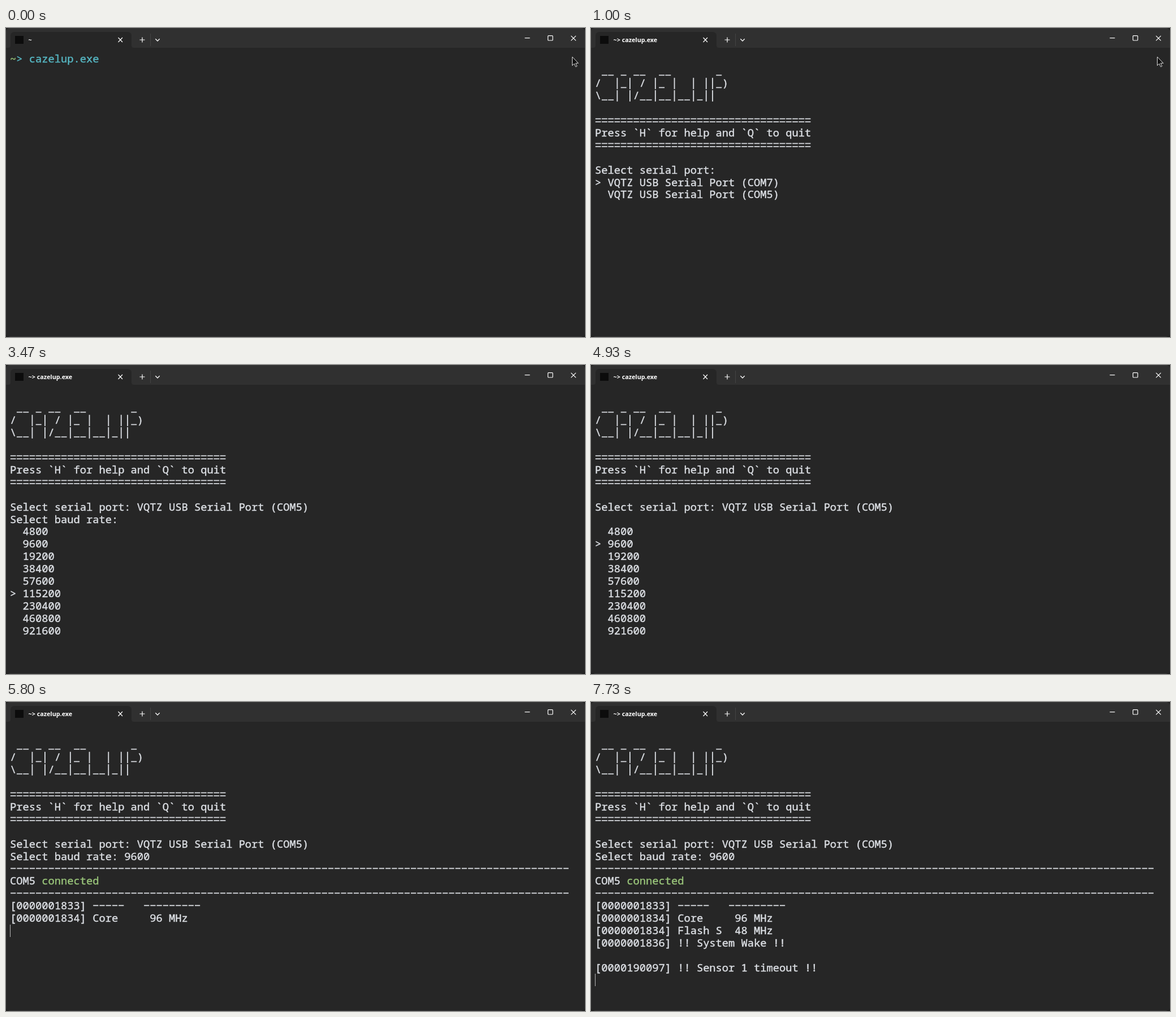
These frames come from a looping animation (1024 by 547 pixels, 8 s). An HTML page with a canvas:

```html
<!DOCTYPE html>
<html lang="en">
<head>
<meta charset="utf-8">
<title>Terminal</title>
<style>
html, body { margin: 0; width: 100%; height: 100%; overflow: hidden; background: #262626; }
canvas { display: block; }
</style>
</head>
<body>
<canvas id="stage" width="1024" height="547"></canvas>
<script>
const ctx = document.getElementById('stage').getContext('2d');
const LOOP = 8000;
const LEFT = 7.1, TOP = 43.1, CELL = 11.237, LINE = 21.9;
const WHITE = '#dcdfe4', GREEN = '#98c379', CYAN = '#56b6c2';
const APP = 'cazelup.exe';
const PORT = n => `VQTZ USB Serial Port (COM${n})`;
const RATES = [4800, 9600, 19200, 38400, 57600, 115200, 230400, 460800, 921600];

// Strokes that fill the cell: x, y, width, height
const STROKES = {
  '-': [[1, 9.7, 9.2, 1.8]],
  '=': [[0.7, 7.2, 9.8, 1.7], [0.7, 12.7, 9.8, 1.7]],
  '_': [[0.6, 17.7, 10, 1.7]],
  '|': [[4.7, 1.3, 1.8, 20]]
};

const BANNER = [
  ' __ _ __  __       _ ',
  '/  |_| / |_ |  | ||_)',
  '\\__| |/__|__|__|_||',
  '',
  '='.repeat(34),
  'Press `H` for help and `Q` to quit',
  '='.repeat(34)
];

// Log lines with the time each one arrives
const LOG = [
  [5270, '[0000001833] -----   ---------'],
  [5800, '[0000001834] Core     96 MHz'],
  [6330, '[0000001834] Flash S  48 MHz'],
  [6800, '[0000001836] !! System Wake !!'],
  [7200, ''],
  [7730, '[0000190097] !! Sensor 1 timeout !!']
];

// Index of the marked rate over time
const PICKS = [[3470, 5], [3800, 4], [3930, 3], [4070, 2], [4400, 1]];

function print(row, text, col = 0, color = WHITE) {
  ctx.fillStyle = ctx.strokeStyle = color;
  ctx.lineWidth = 0.45; // thickens the regular weight a little
  ctx.lineJoin = 'round';
  ctx.font = '18.73px "Noto Sans Mono", "DejaVu Sans Mono", monospace';
  const y = TOP + row * LINE;
  [...text].forEach((ch, i) => {
    const x = LEFT + (col + i) * CELL;
    if (STROKES[ch]) {
      STROKES[ch].forEach(([dx, dy, w, h]) => ctx.fillRect(x + dx, y + dy, w, h));
    } else if (ch !== ' ') {
      ctx.fillText(ch, x, y + 17.4);
      ctx.strokeText(ch, x, y + 17.4);
    }
  });
}

function caret(row, col = 0) {
  ctx.fillStyle = '#b4b4b4';
  ctx.fillRect(Math.round(LEFT + col * CELL), Math.round(TOP + row * LINE), 1, 22);
}

function box(x, y, w, h, r, color) {
  ctx.fillStyle = color;
  ctx.beginPath();
  ctx.roundRect(x, y, w, h, r);
  ctx.fill();
}

function line(d, color = '#fff', width = 1.2) {
  ctx.strokeStyle = color;
  ctx.lineWidth = width;
  ctx.lineJoin = 'miter';
  ctx.stroke(new Path2D(d));
}

function drawWindow(title) {
  ctx.fillStyle = '#1c1c1c';
  ctx.fillRect(0, 0, 1024, 547);
  box(0, 0, 1024, 547, 6, '#262626');
  box(0, 0, 1024, 35, [6, 6, 0, 0], '#303030');
  ctx.fillStyle = '#262626';
  ctx.fill(new Path2D('M4 35Q8 35 8 31V14Q8 7 15 7H215Q222 7 222 14V31Q222 35 226 35Z'));
  line('M6 .5H1018M6 546.5H1018', '#363636', 1);

  box(16, 14, 15, 14, 0, '#0c0c0c');
  ctx.fillStyle = '#fff';
  ctx.font = '700 10.8px "Open Sans", "Noto Sans", sans-serif';
  ctx.fillText(title, 39.5, 25.3);

  line('M198.5 17l7.5 8m0-8l-7.5 8');
  line('M236.5 21h9M241 16.5v9');
  line('M255.5 10v22', '#444', 1);
  line('M264.3 19.3l3.7 3.7 3.7-3.7', '#fff', 1.3);
  line('M917.5 17.7h9');
  line('M959.5 13.6h6.4q1 0 1 1v6.4q0 1-1 1h-6.4q-1 0-1-1v-6.4q0-1 1-1z');
  line('M999.3 13.8l8.6 8.6m0-8.6l-8.6 8.6');
}

function drawPointer() {
  const d = 'M1001.5 51v15.4l3.5-3.3 2.5 5.6 2.4-1.1-2.4-5.3h4.7z';
  ctx.fillStyle = '#111';
  ctx.fill(new Path2D(d));
  line(d, '#ddd', 1);
}

function drawPorts(marked) {
  print(9, 'Select serial port:');
  [7, 5].forEach((n, i) => print(10 + i, (i === marked ? '> ' : '  ') + PORT(n)));
}

function drawRates(t) {
  const marked = PICKS.filter(([at]) => t >= at).pop()[1];
  if (t < 4930) print(10, 'Select baud rate:');
  RATES.forEach((rate, i) => {
    const redrawing = i === 0 && t >= 4400 && t < 4470;
    if (!redrawing) print(11 + i, (i === marked ? '> ' : '  ') + rate);
  });
}

function drawLog(t) {
  const rule = '-'.repeat(88);
  print(10, 'Select baud rate: 9600');
  print(11, rule);
  print(12, 'COM5');
  print(12, 'connected', 5, GREEN);
  print(13, rule);
  const shown = LOG.filter(([at]) => t >= at);
  shown.forEach(([, text], i) => print(14 + i, text));
  caret(14 + shown.length);
}

function draw(t) {
  drawWindow(t < 800 ? '~' : '~> ' + APP);
  if (t < 930) {
    print(0, '~', 0, GREEN);
    print(0, '> ' + APP, 1, CYAN);
    if (t >= 800) caret(1);
    else if (t >= 130) caret(0, 14);
  } else {
    BANNER.forEach((text, i) => print(1 + i, text));
    if (t >= 3470) {
      print(9, 'Select serial port: ' + PORT(5));
      (t < 5000 ? drawRates : drawLog)(t);
    } else if (t >= 1000) {
      drawPorts(t < 2470 ? 0 : 1);
    }
  }
  if (t < 1130) drawPointer();
  else if (t < 1730) box(1014, 42, 6, 499, 3, '#5c5c5c');
}

const start = performance.now();
function tick() {
  draw((performance.now() - start) % LOOP);
  requestAnimationFrame(tick);
}
tick();
</script>
</body>
</html>
```
